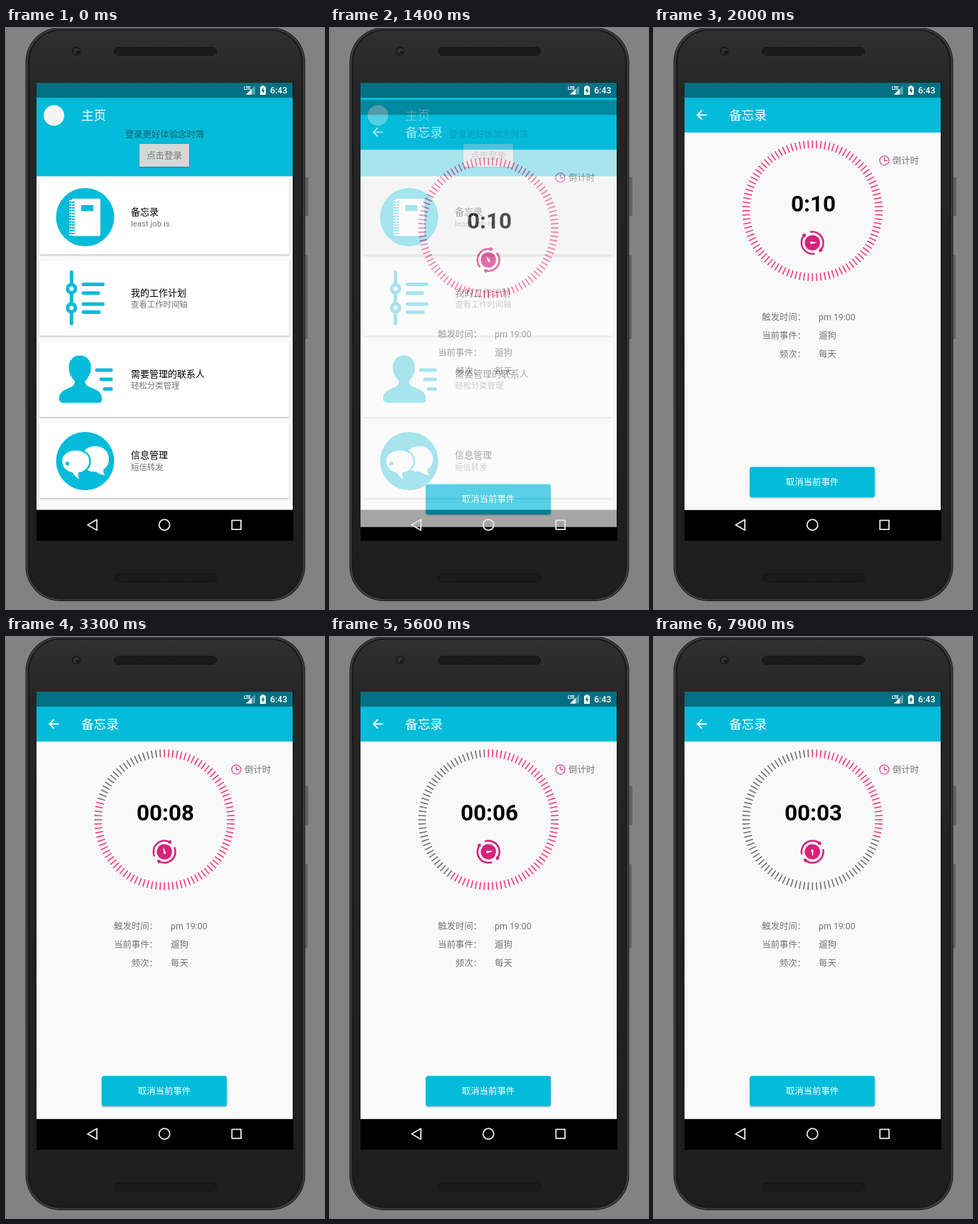
Animation of 448x817 px, one loop 8000 ms. Source, as an HTML page:

```html
<!DOCTYPE html>
<html lang="zh-CN">
<head>
<meta charset="utf-8">
<title>备忘录</title>
<style>
html, body { margin: 0; width: 100%; height: 100%; overflow: hidden; background: #828282; }
svg { display: block; width: 448px; height: 817px; font-family: Roboto, "Noto Sans CJK SC", "Noto Sans CJK", sans-serif; }
.cyan { fill: #04bbda; }
.line { fill: none; stroke: #04bbda; stroke-width: 5; stroke-linecap: round; }
.card { fill: #fff; filter: drop-shadow(0 1px 1px rgba(0,0,0,.3)); }
.card.raised { filter: drop-shadow(0 2px 2px rgba(0,0,0,.36)); }
.head { font-size: 13px; fill: #000; }
.sub { font-size: 11.4px; fill: #757575; }
.info { font-size: 12.4px; fill: #757575; }
.title { font-size: 17.6px; fill: #fff; }
.mid { text-anchor: middle; }
.end { text-anchor: end; }
.btn { filter: drop-shadow(0 1.5px 1px rgba(0,0,0,.32)); }
</style>
</head>
<body>
<svg viewBox="0 0 448 817">
  <defs>
    <linearGradient id="body" x2="0" y2="1">
      <stop offset="0" stop-color="#303030"/>
      <stop offset=".1" stop-color="#262626"/>
      <stop offset="1" stop-color="#1e1e1e"/>
    </linearGradient>
    <pattern id="mesh" width="3" height="3" patternUnits="userSpaceOnUse">
      <rect width="3" height="3" fill="#262626"/>
      <circle cx="1" cy="1" r=".9" fill="#0b0b0b"/>
      <circle cx="2.5" cy="2.5" r=".7" fill="#0b0b0b"/>
    </pattern>
    <clipPath id="screen"><rect x="43" y="77" width="361" height="644"/></clipPath>
    <clipPath id="cardClip"><rect x="47" y="212.500" width="352" height="106" rx="1.500"/></clipPath>
  </defs>

  <!-- phone -->
  <rect width="448" height="817" fill="#828282"/>
  <g fill="#646464" stroke="#585858" stroke-width=".7">
    <rect x="420" y="210" width="5.500" height="54" rx="1"/>
    <rect x="420" y="320" width="4.500" height="117" rx="1"/>
  </g>
  <rect x="27.500" y="-1" width="394" height="807" rx="49" fill="#202020"/>
  <rect x="29.500" y="1" width="390" height="803" rx="47" fill="none" stroke="#4d4d4d" stroke-width="1.200"/>
  <rect x="32.500" y="3" width="384" height="798" rx="45" fill="url(#body)" stroke="#171717"/>
  <circle cx="99" cy="32.500" r="7" fill="#1c1c1c" stroke="#3a3a3a" stroke-width=".6"/>
  <circle cx="99" cy="32.500" r="4" fill="#343434"/>
  <circle cx="100.500" cy="34" r="2" fill="#151515"/>
  <g fill="url(#mesh)" stroke="#151515">
    <rect x="152.500" y="27" width="144" height="11.500" rx="5.700"/>
    <rect x="152.500" y="767.500" width="144" height="11.500" rx="5.700"/>
  </g>
  <rect x="43" y="77" width="362" height="644" fill="#000"/>

  <g clip-path="url(#screen)">
    <!-- home page -->
    <g id="home">
      <rect x="43" y="77" width="361" height="600.600" fill="#fafafa"/>
      <rect x="43" y="77" width="361" height="131.500" class="cyan"/>
      <rect x="43" y="77" width="361" height="21" fill="#007082"/>
      <circle cx="67.500" cy="123" r="14.500" fill="#f4f4f4"/>
      <text x="106" y="129" class="title">主页</text>
      <text x="223.500" y="154" class="mid" font-size="12.400" fill="#176371">登录更好体验念时簿</text>
      <rect x="188" y="163" width="70" height="32" rx="1" fill="#d6d7d7" class="btn"/>
      <text x="223" y="183.500" class="mid info">点击登录</text>
      <g id="cards"></g>
      <g clip-path="url(#cardClip)"><circle id="ripple" cx="223" cy="266" r="0" opacity=".06"/></g>

      <!-- notebook -->
      <circle cx="111.500" cy="266" r="41" class="cyan"/>
      <rect x="92.500" y="240" width="40.500" height="52.500" rx="2" fill="#fff"/>
      <rect x="106" y="249" width="17" height="8.500" class="cyan"/>
      <path d="M95 244V291" stroke="#04bbda" stroke-width="4" stroke-dasharray="2 2"/>
      <path d="M93.500 242V292" stroke="#fff" stroke-width="9" stroke-dasharray="1.600 2.400"/>

      <!-- timeline -->
      <path d="M92.300 343.500V415.500" class="line"/>
      <g fill="#fff" stroke="#04bbda" stroke-width="5">
        <circle cx="92.300" cy="366.500" r="5.600"/>
        <circle cx="92.300" cy="393.500" r="5.600"/>
      </g>
      <path d="M109 360.500H136.500M109 372.800H130M109 388.200H136.500M109 399.500H131" class="line"/>

      <!-- contact -->
      <path class="cyan" d="M104 460.500C94 460.500 88.500 468 88.500 477C88.500 486 92.500 492 97 496.500C97 502 94 504 88 506.500C79 510 75 514 74.500 521Q74.500 524 78 527H131.500Q135 527 135.200 522C135 514 131 510 122 506.500C115 504 111.500 502 111.500 496.500C116 492 119.700 486 119.700 477C119.700 468 114 460.500 104 460.500Z"/>
      <path d="M128 481H148M134 494H148M139 507.500H148" class="line"/>

      <!-- messages -->
      <circle cx="111.500" cy="609" r="41" class="cyan"/>
      <path fill="#fff" d="M126 588C138 588 145 597 145 606C145 613 142 618 137 621Q137 626 139.500 629Q132 628 127 624C113 625 106 616 106 606C106 595 115 588 126 588Z"/>
      <path fill="#fff" stroke="#04bbda" stroke-width="2.500" d="M98 593C111 593 118.500 600 118.500 609C118.500 618 111 625 103 626Q102 631 106 636Q97 634 93 626C83 624 78 617 78 609C78 600 86 593 98 593Z"/>
      <circle cx="86.500" cy="612.500" r="2.800" class="cyan"/>
    </g>

    <!-- countdown page -->
    <g id="memo">
      <rect x="43" y="77" width="361" height="600.600" fill="#f9f9f9"/>
      <rect x="43" y="77" width="361" height="70" class="cyan"/>
      <rect x="43" y="77" width="361" height="21" fill="#007082"/>
      <path d="M74.500 122.300H62M67.500 116L61.200 122.300L67.500 128.600" fill="none" stroke="#fff" stroke-width="1.800"/>
      <text x="106" y="129" class="title">备忘录</text>
      <g fill="none" stroke="#d94a8c" stroke-width="1.300">
        <circle cx="324.500" cy="186.300" r="6.500"/>
        <path d="M324.500 181.500V186.500H329"/>
      </g>
      <text x="336" y="191" class="info">倒计时</text>
      <g id="ticks" stroke-width="1.700"></g>
      <text id="clock" x="224.500" y="258" class="mid" font-size="31.500" font-weight="700"></text>
      <g id="dial" fill="none" stroke="#d4237a" stroke-width="2.500" stroke-linejoin="round">
        <circle r="10.800" fill="#d4237a" stroke="none"/>
        <path id="arc"/>
        <path id="arc2" transform="rotate(180)"/>
        <path d="M0 -6.500L1.700 1.500A1.700 1.700 0 0 1 -1.700 1.500Z" fill="#fff" stroke="none"/>
      </g>
      <g id="rows" class="info"></g>
      <rect x="135" y="617.300" width="176" height="42.500" rx="3" class="cyan btn"/>
      <text x="223" y="643" class="mid" font-size="12.400" fill="#fff">取消当前事件</text>
    </g>
  </g>

  <!-- system bars -->
  <g fill="#fff">
    <text x="335" y="86.500" font-size="7" font-weight="700" letter-spacing="-.7">LTE</text>
    <path d="M351 81V93.500H338Z" opacity=".35"/>
    <path d="M346 86V93.500H338Z"/>
    <path d="M358 82.500H360V81H364V82.500H366V94H358Z"/>
    <path d="M362.600 83.500L359.600 88.500H361.600V92.500L364.600 87.300H362.600Z" fill="#007082"/>
    <text x="372" y="92" font-size="12.400" font-weight="500">6:43</text>
  </g>
  <g fill="none" stroke="#e8e8e8" stroke-width="1.800" stroke-linejoin="round">
    <path d="M115 698.700L128 691.200V706.200Z"/>
    <circle cx="223.200" cy="698.700" r="7.500"/>
    <rect x="318.300" y="692.300" width="12.800" height="12.800"/>
  </g>
</svg>
<script>
const LOOP = 8000, STEP = 100, TICKS = 100;
const OPEN = 1357, FIRST_TICK = 2200, SECOND = 900;
const $ = id => document.getElementById(id);

function add(parent, tag, attrs, text) {
  const el = document.createElementNS("http://www.w3.org/2000/svg", tag);
  for (const k in attrs) el.setAttribute(k, attrs[k]);
  if (text) el.textContent = text;
  parent.appendChild(el);
  return el;
}

function polar(r, deg) {
  const a = deg * Math.PI / 180;
  return [r * Math.sin(a), -r * Math.cos(a)];
}

const cards = [
  ["备忘录", "least job is"],
  ["我的工作计划", "查看工作时间轴"],
  ["需要管理的联系人", "轻松分类管理"],
  ["信息管理", "短信转发"]
].map(([head, sub], i) => {
  const y = 212.5 + i * 114.2;
  const card = add($("cards"), "rect", { x: 47, y, width: 352, height: 106, rx: 1.5, class: "card" });
  add($("cards"), "text", { x: 176, y: y + 50, class: "head" }, head);
  add($("cards"), "text", { x: 176, y: y + 66.5, class: "sub" }, sub);
  return card;
});

[["触发时间：", "pm 19:00"], ["当前事件：", "遛狗"], ["频次：", "每天"]].forEach(([label, value], i) => {
  const y = 410.7 + i * 25.9;
  add($("rows"), "text", { x: 214, y, class: "end" }, label);
  add($("rows"), "text", { x: 232, y }, value);
});

const ticks = Array.from({ length: TICKS }, (_, i) => {
  const deg = i * 360 / TICKS;
  const [x1, y1] = polar(88, deg), [x2, y2] = polar(99, deg);
  return add($("ticks"), "line", { x1: 223.2 + x1, y1: 257 + y1, x2: 223.2 + x2, y2: 257 + y2 });
});

// curved arrow; its head leads the needle by about 50 degrees
const arrow = `M${polar(15.5, -100)}A15.5 15.5 0 0 1 ${polar(15.5, 46)}` +
  `M${polar(14.4, 42)}L${polar(17, 42)}L${polar(15.7, 50)}Z`;
$("arc").setAttribute("d", arrow);
$("arc2").setAttribute("d", arrow);

function draw(time) {
  const t = Math.floor(time / STEP) * STEP;

  const pressed = t >= 1000;
  cards[0].setAttribute("class", pressed ? "card raised" : "card");
  $("ripple").setAttribute("r", pressed ? (t < 1100 ? 90 : 200) : 0);

  // the page fades in quickly while it slides up
  const age = Math.max(0, t - OPEN) / 0.9;
  const fade = 1 - Math.max(0, 1 - age / 200) ** 4;
  const shift = 50.3 * Math.max(0, 1 - age / 350) ** 5;
  const memo = $("memo");
  memo.setAttribute("visibility", fade > 0 ? "visible" : "hidden");
  memo.setAttribute("opacity", fade);
  memo.setAttribute("transform", `translate(0 ${shift})`);

  const left = t < FIRST_TICK ? 10 : 9 - Math.floor((t - FIRST_TICK) / SECOND);
  $("clock").textContent = left === 10 ? "0:10" : "00:0" + left;
  ticks.forEach((el, i) => el.setAttribute("stroke", i < left * 10 ? "#f5427f" : "#777"));
  $("dial").setAttribute("transform", `translate(223.2 302) rotate(${88 + 0.198 * (t - 2000)})`);
}

function loop() {
  draw(performance.now() % LOOP);
  requestAnimationFrame(loop);
}
loop();
</script>
</body>
</html>
```
